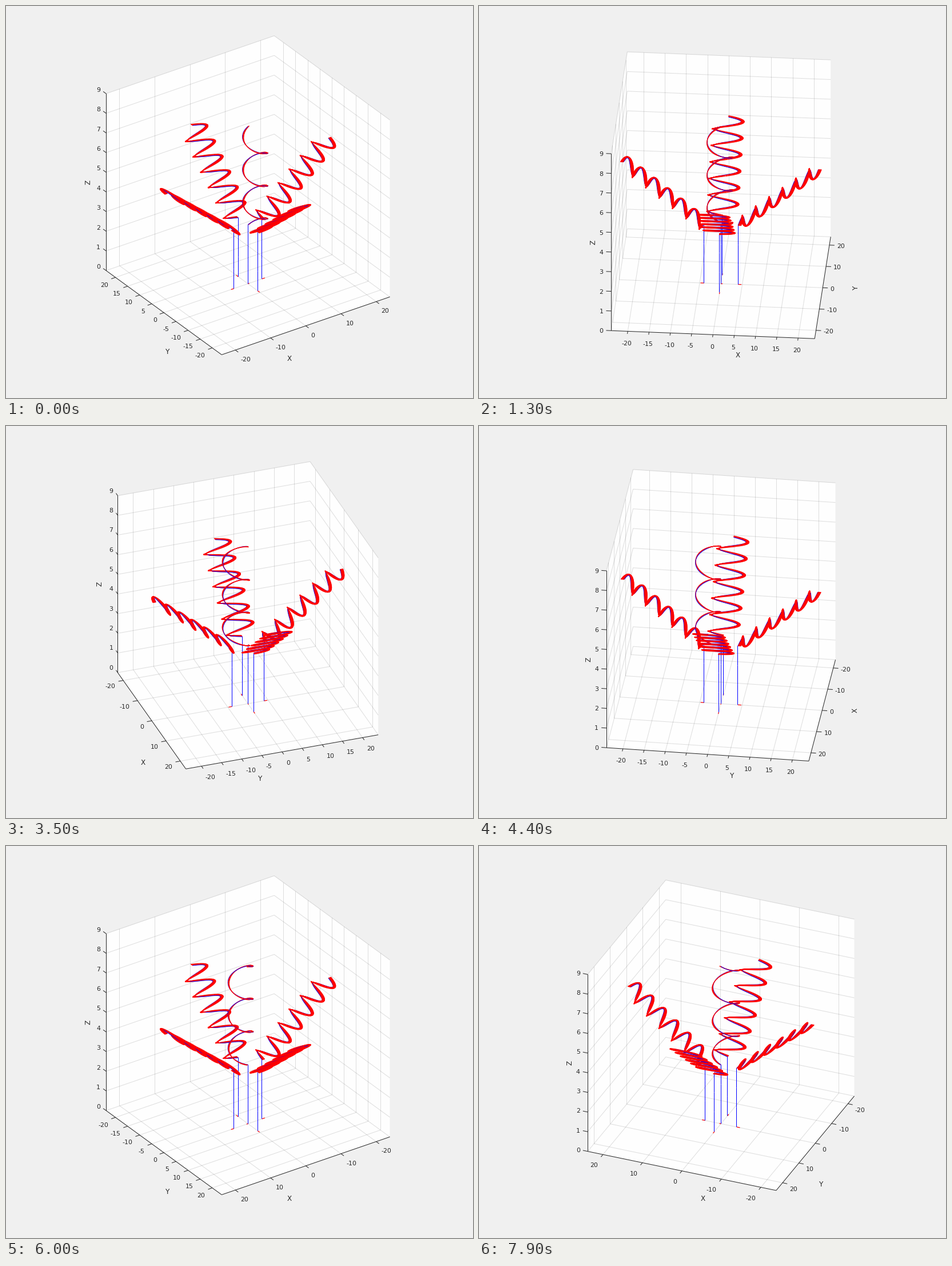
Write a matplotlib script that moves like this. It is 817 px wide and 685 px high and loops after 8000 ms.

```python
import numpy as np
import matplotlib.pyplot as plt
from matplotlib.animation import FuncAnimation
from matplotlib.collections import LineCollection

W, H, DPI = 817, 685, 64
PT = 72 / DPI                    # points per pixel
FRAMES, INTERVAL = 80, 100
AZ0, AZ_STEP, EL = -34.5, 3, np.radians(30)
SIDE, R, ZMAX = 357, 23.88, 9    # cube edge in px, x/y half range, z range
K, KZ = SIDE / (2 * R), SIDE / ZMAX
CX, CY = 423.3, 485.3            # screen place of the floor centre
TICK = 0.025 * 2 * R
TURN = 160                       # samples per turn
DARK = "#262626"

plt.rcParams["font.family"] = "DejaVu Sans"


def project(p, az):
    """Orthographic view: screen points and depth towards the camera."""
    p = np.asarray(p, float)
    x, y, z = p[..., 0] * K, p[..., 1] * K, p[..., 2] * KZ
    c, s = np.cos(az), np.sin(az)
    away = y * c - x * s
    sx = CX + x * c + y * s
    sy = CY - away * np.sin(EL) - z * np.cos(EL)
    return np.stack([sx, sy], -1), z * np.sin(EL) - away * np.cos(EL)


def crisp(segments):
    """Put upright lines on pixel centres."""
    seg = np.array(segments)
    upright = np.abs(seg[:, 0, 0] - seg[:, 1, 0]) < 1e-6
    seg[upright, :, 0] = np.floor(seg[upright, :, 0]) + 0.5
    return seg


def pairs(line):
    return np.stack([line[:-1], line[1:]], 1)


def flight(path, heading):
    """Red heading strokes and blue track, with the climb from the floor."""
    base = path[0] * [1, 1, 0]
    starts = np.vstack([base, path])
    heads = np.vstack([heading[0], heading])
    red = np.stack([starts, starts + heads], 1)
    climb = np.linspace(base, path[0], 4)
    return red, np.vstack([pairs(climb), pairs(path[::4])])


def turns(n):
    return np.linspace(0, 2 * np.pi * n, n * TURN + 1)


def arm(quarter):
    t = turns(6)
    c, s = [(1, 0), (0, 1), (-1, 0), (0, -1)][quarter]
    spin = np.array([[c, s, 0], [-s, c, 0], [0, 0, 1]])
    path = np.stack([4 + t / 2, 3 * np.sin(t), 3 + t / (4 * np.pi)], 1)
    head = 0.8 * np.stack([np.cos(t), np.sin(t), 0 * t], 1)
    return flight(path @ spin, head @ spin)


def column():
    t = turns(3)
    path = np.stack([3 * np.sin(t), 3 * np.cos(t) - 3, 3 + 5 * t / t[-1]], 1)
    head = 0.4 * np.stack([np.cos(t), np.sin(t), 0 * t], 1)
    return flight(path, head)


flights = [arm(q) for q in range(4)] + [column()]
reds = np.vstack([f[0] for f in flights])
blues = np.vstack([f[1] for f in flights])
strokes = np.vstack([reds, blues])
is_red = np.arange(len(strokes)) < len(reds)
colors = np.where(is_red[:, None], [[1, 0, 0, 1]], [[0, 0, 1, 1]])
widths = np.where(is_red, 1.2, 1.0) * PT

fig = plt.figure(figsize=(W / DPI, H / DPI), dpi=DPI, facecolor="#f0f0f0")
ax = fig.add_axes([0, 0, 1, 1])
ax.set_xlim(0, W)
ax.set_ylim(H, 0)
ax.axis("off")

box, = ax.fill([0, 1, 1], [0, 0, 1], color="#fefefe", lw=0, zorder=0)
grid = LineCollection([], colors=[(0.15, 0.15, 0.15, 0.15)], linewidths=PT, zorder=1)
frame = LineCollection([], colors=DARK, linewidths=PT, zorder=2)
tracks = LineCollection([], zorder=3)
for col in (grid, frame, tracks):
    col.set_snap(False)
    ax.add_collection(col, autolim=False)
texts = []


def put(x, y, s, px, ha="center", rot=0):
    drop = 0.365 * px
    x, y = (x + drop, y) if rot else (x, y + drop)
    texts.append(ax.text(x, y, s, fontsize=px * PT, color=DARK, ha=ha,
                         va="baseline", rotation=rot, rotation_mode="anchor"))


def tick_label(end, d, s, floor):
    """Place a number beyond a tick end; d is the tick's screen direction."""
    dx, dy = d
    if floor and dy > 0.08:
        down = 6.7 + 9.5 * dy
    else:
        down = 0.7 + 7 * dy
    if abs(dx) < 0.5 and floor:
        put(end[0] + 7 * dx, end[1] + down, s, 11)
    elif dx > 0:
        put(end[0] + 4, end[1] + down, s, 11, "left")
    else:
        put(end[0] - 5, end[1] + down, s, 11, "right")


def floor_step(b):
    return 5 if b < 21 or 45 < b < 61.5 else 10


def name_offset(b, toward):
    """Offset of an axis name; b is the axis' turn away from horizontal."""
    a = min(b, 90 - b)
    if b <= 45:
        return toward * 43.3 * np.cos(np.radians(1.4 * a)), 32 + 0.71 * a
    if a < 9:
        return -toward * 57, 0
    return -toward * (44 - 1.47 * a), 78 - 0.3 * a


def update(i):
    az = np.radians(AZ0 + AZ_STEP * i)
    c, s = np.cos(az), np.sin(az)

    def scr(*p):
        return project(p, az)[0]

    near = np.array([np.sign(s), -np.sign(c)])
    left = np.array([-np.sign(c), -np.sign(s)])
    fx, fy = near * R
    lx, ly = left * R

    for t in texts:
        t.remove()
    texts.clear()

    box.set_xy([scr(lx, ly, ZMAX), scr(-fx, -fy, ZMAX), scr(-lx, -ly, ZMAX),
                scr(-lx, -ly, 0), scr(fx, fy, 0), scr(lx, ly, 0)])

    dark = [[scr(lx, ly, 0), scr(lx, ly, ZMAX)],
            [scr(-R, fy, 0), scr(R, fy, 0)],
            [scr(fx, -R, 0), scr(fx, R, 0)]]
    light = []

    def rule(*points):
        p = [scr(*q) for q in points]
        light.extend(zip(p, p[1:]))

    def tick(a, b, label, floor):
        a, b = scr(*a), scr(*b)
        dark.append([a, b])
        tick_label(b, (b - a) / np.hypot(*(b - a)), label, floor)

    bx = np.degrees(np.arctan2(abs(s), abs(c)))
    for v in range(-20, 21, floor_step(bx)):
        rule((v, fy, 0), (v, -fy, 0), (v, -fy, ZMAX))
        tick((v, fy, 0), (v, fy + near[1] * TICK, 0), str(v), True)
    for v in range(-20, 21, floor_step(90 - bx)):
        rule((fx, v, 0), (-fx, v, 0), (-fx, v, ZMAX))
        tick((fx, v, 0), (fx + near[0] * TICK, v, 0), str(v), True)
    ox, oy = (left - near) / 2 * TICK
    for v in range(ZMAX + 1):
        rule((lx, ly, v), (-fx, -fy, v), (-lx, -ly, v))
        tick((lx, ly, v), (lx + ox, ly + oy, v), str(v), False)

    corner = scr(fx, fy, 0)
    for name, mid, b in (("X", scr(0, fy, 0), bx), ("Y", scr(fx, 0, 0), 90 - bx)):
        dx, dy = name_offset(b, np.sign(corner[0] - mid[0]))
        put(mid[0] + dx, mid[1] + dy, name, 12, rot=90 if b > 81 else 0)
    zx, zy = scr(lx, ly, ZMAX / 2)
    put(zx - 32, zy, "Z", 12, rot=90)

    grid.set_segments(crisp(light))
    frame.set_segments(crisp(dark))

    pts, depth = project(strokes, az)
    order = np.argsort(depth.mean(1), kind="stable")
    tracks.set_segments(crisp(pts[order]))
    tracks.set_color(colors[order])
    tracks.set_linewidth(widths[order])
    return [box, grid, frame, tracks, *texts]


anim = FuncAnimation(fig, update, frames=FRAMES, interval=INTERVAL,
                     repeat=True, repeat_delay=0, blit=False)
plt.show()
```
